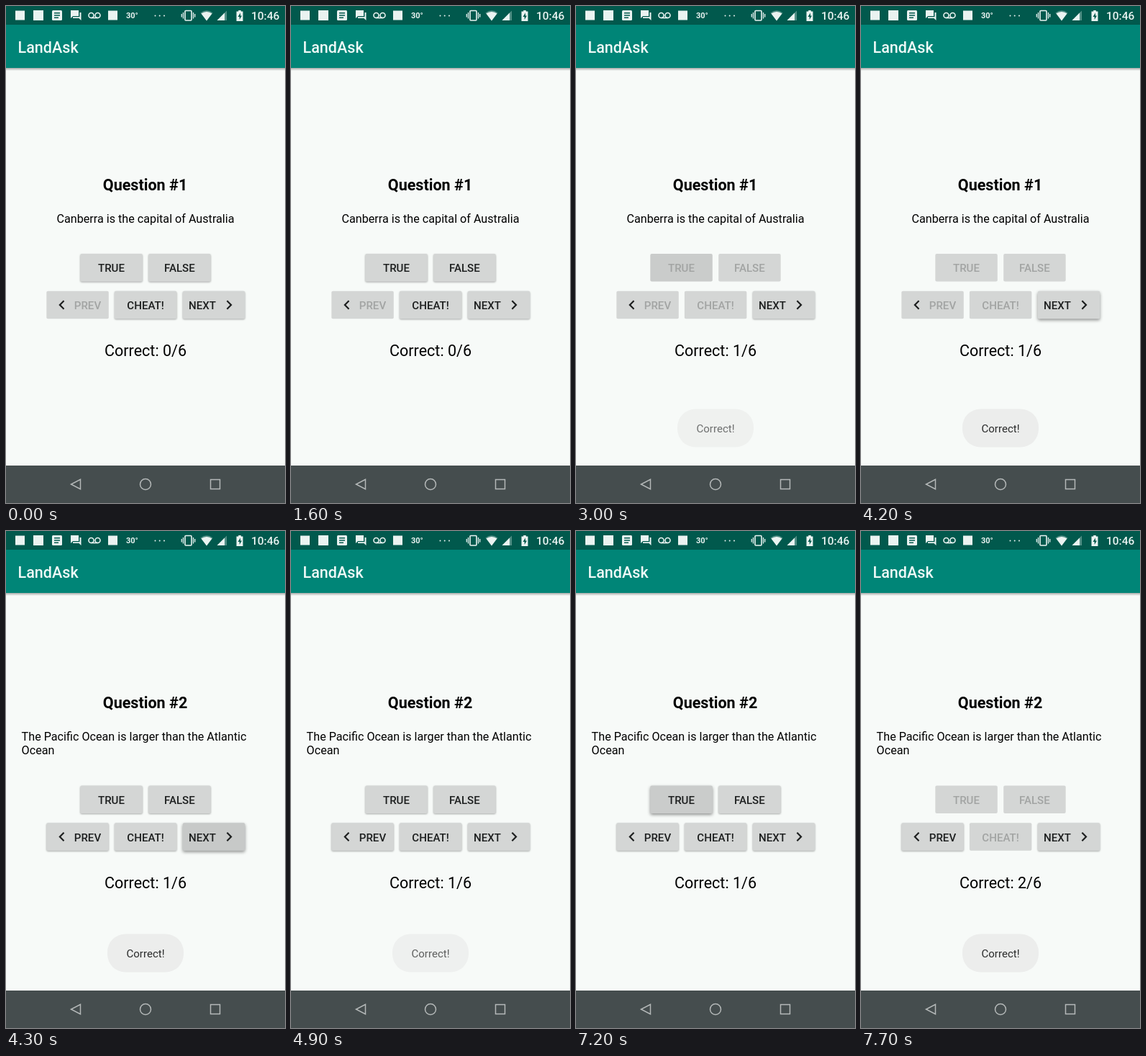
Write an HTML page that moves like this. It is 388 px wide and 690 px high and loops after 8000 ms.

```html
<!DOCTYPE html>
<html lang="en">
<head>
<meta charset="utf-8">
<title>Quiz screen</title>
<style>
  html, body { margin: 0; width: 100%; height: 100%; overflow: hidden; background: #f7faf8; }
  svg { display: block; width: 388px; height: 690px; font-family: Roboto, sans-serif; }
  .mid { text-anchor: middle; }
  .head { font-size: 21.56px; }
  .body { font-size: 16.17px; }
  .btn { font-size: 15.09px; font-weight: 500; fill: #1d1f1f; }
  .btn .face { fill: #d4d6d5; filter: drop-shadow(0 1px 1px rgba(0,0,0,.32)); }
  .btn.raised .face { filter: drop-shadow(0 2px 2px rgba(0,0,0,.42)); }
  .btn.off .face { filter: none; }
  .btn.off text { fill: #a2a4a3; }
  .icons { fill: #eaf3f1; }
  .line { fill: none; stroke: #eaf3f1; }
</style>
</head>
<body>
<svg viewBox="0 0 388 690">
  <defs>
    <linearGradient id="shade" x2="0" y2="1">
      <stop offset="0" stop-opacity=".32"/>
      <stop offset="1" stop-opacity="0"/>
    </linearGradient>
  </defs>
  <rect width="388" height="690" fill="#f7faf8"/>
  <rect y="86" width="388" height="4" fill="url(#shade)"/>
  <rect y="26" width="388" height="60" fill="#008577"/>
  <rect width="388" height="26" fill="#01594d"/>
  <text class="head" x="16.5" y="64.5" font-weight="500" fill="#eef9f7">LandAsk</text>

  <g class="icons">
    <rect x="13" y="6.5" width="13" height="13"/>
    <rect x="38" y="6" width="14" height="14"/>
    <rect x="64" y="6" width="14" height="14" rx="1.5"/>
    <path d="M67 9.7h8M67 13h8M67 16.3h6" stroke="#01594d" stroke-width="1.4"/>
    <path d="M90 6h11v8h-8l-3 3z"/>
    <path d="M102.5 9h2v11l-3-3h-8.500v-1.700h9.500z"/>
    <rect x="142" y="6.500" width="13" height="13"/>
    <text x="167" y="17" font-size="11" font-weight="700">30°</text>
    <circle cx="207.500" cy="13.500" r="1"/>
    <circle cx="213.700" cy="13.500" r="1"/>
    <circle cx="220" cy="13.500" r="1"/>
    <path d="M279 20.500L270.500 9.500Q279 2.800 287.500 9.500Z" opacity=".35"/>
    <path d="M279 20.500L271.500 10.500Q279 5.500 286.500 10.500Z"/>
    <path d="M307 6.500V20H293.500Z" opacity=".35"/>
    <path d="M304 9.500V20H293.500Z"/>
    <path d="M320.500 7.500h2.700V6h3.600v1.500h2.700V21h-9z"/>
    <path d="M326 9.500l-3.500 5.500h2.200v4l3.300-5.500h-2z" fill="#01594d"/>
    <text x="341" y="18.800" font-size="15.500" font-weight="500">10:46</text>
  </g>
  <g class="line" stroke-width="1.600">
    <circle cx="118.500" cy="13" r="3.500"/>
    <circle cx="127.500" cy="13" r="3.500"/>
    <path d="M118.500 16.500h9"/>
    <rect x="249" y="6.500" width="9" height="13.500" rx="1"/>
    <path d="M246.500 9v8.500M260.500 9v8.500M244.300 11v4.500M262.700 11v4.500" stroke-width="1.300"/>
  </g>

  <g id="upper">
    <text id="title" class="head mid" x="193.500" y="255.700" font-weight="700"></text>
    <text id="one" class="body mid" x="194" y="300.700">Canberra is the capital of Australia</text>
    <g id="two" class="body">
      <text x="21.600" y="300.700">The Pacific Ocean is larger than the Atlantic</text>
      <text x="21.600" y="319.700">Ocean</text>
    </g>
  </g>
  <g id="lower">
    <g id="buttons"></g>
    <text id="score" class="head mid" x="194" y="486"></text>
  </g>

  <g id="toast">
    <rect x="141" y="559.500" width="106" height="53" rx="25" fill="#ecedec"/>
    <text class="mid" x="194" y="592" font-size="15.090" fill="#2b2c2c">Correct!</text>
  </g>

  <rect y="638" width="388" height="52" fill="#454d4e"/>
  <g fill="none" stroke="#b4b8b8" stroke-width="1.500">
    <path d="M103.500 657.300V670.700L90.500 664Z"/>
    <circle cx="194" cy="664" r="7.500"/>
    <rect x="284.500" y="657.500" width="13" height="13"/>
  </g>
</svg>
<script>
const $ = id => document.getElementById(id);
const DURATION = 8000, TICK = 100, SHIFT = 9.5;
const CHEVRON = 'M15.41 7.41L14 6l-6 6 6 6 1.41-1.41L10.83 12z';

const chevron = (x, dir) =>
  `<path d="${CHEVRON}" transform="translate(${x} 415) scale(${1.078 * dir} 1.078) translate(-11.7 -12)"/>`;

function addButton(label, x, y, textX, extra = '') {
  const g = document.createElementNS('http://www.w3.org/2000/svg', 'g');
  const box = `x="${x}" y="${y}" width="86.500" height="38.500" rx="2"`;
  const anchor = textX ? `x="${textX}"` : `x="${x + 43.2}" text-anchor="middle"`;
  g.innerHTML = `<rect class="face" ${box}/><rect class="ink" ${box} opacity="0"/>${extra}
    <text ${anchor} y="${y + 25.3}">${label}</text>`;
  $('buttons').append(g);
  const ink = g.querySelector('.ink');
  return (enabled, raised, press) => {
    g.setAttribute('class', 'btn' + (enabled ? '' : ' off') + (raised ? ' raised' : ''));
    ink.setAttribute('opacity', press);
  };
}

const setTrue = addButton('TRUE', 103.3, 344);
const setFalse = addButton('FALSE', 198.2, 344);
const setPrev = addButton('PREV', 56.3, 395.8, 94.8, chevron(77.3, 1));
const setCheat = addButton('CHEAT!', 150.9, 395.8);
const setNext = addButton('NEXT', 245.8, 395.8, 254, chevron(310.6, -1));

// [time, value] pairs, linear in between
const TOAST = [[2700, 0], [3150, 1], [4600, 1], [4900, .75], [5200, 0], [7300, 0], [7700, 1]];
const TRUE_INK = [[2400, 0], [2500, .03], [2700, .02], [2900, .06], [3000, .05], [3400, 0],
  [7100, 0], [7200, .05], [7400, .05], [7700, 0]];
const NEXT_INK = [[4200, 0], [4300, .07], [4500, .03], [4800, 0]];

function sample(keys, t) {
  const i = keys.findIndex(k => k[0] > t);
  if (i === 0) return keys[0][1];
  if (i < 0) return keys[keys.length - 1][1];
  const [t0, a] = keys[i - 1], [t1, b] = keys[i];
  return a + (b - a) * (t - t0) / (t1 - t0);
}

const within = (t, from, to) => t >= from && t < to;

function draw(t) {
  const second = t >= 4300;
  const answered = within(t, 2600, 4300) || t >= 7300;
  const shift = second ? SHIFT : 0;

  $('title').textContent = 'Question #' + (second ? 2 : 1);
  $('one').style.display = second ? 'none' : '';
  $('two').style.display = second ? '' : 'none';
  $('upper').setAttribute('transform', `translate(0 ${-shift})`);
  $('lower').setAttribute('transform', `translate(0 ${shift})`);
  $('score').textContent = `Correct: ${t >= 7300 ? 2 : t >= 2600 ? 1 : 0}/6`;

  const pressed = within(t, 2500, 2600) || within(t, 7200, 7300);
  setTrue(!answered, pressed, sample(TRUE_INK, t));
  setFalse(!answered, false, 0);
  setPrev(second, false, 0);
  setCheat(!answered, false, 0);
  setNext(true, within(t, 4200, 4500), sample(NEXT_INK, t));
  $('toast').setAttribute('opacity', sample(TOAST, t));
}

const start = performance.now();
function frame(now) {
  const t = Math.max(0, now - start) % DURATION;
  draw(Math.floor(t / TICK) * TICK);
  requestAnimationFrame(frame);
}
draw(0);
requestAnimationFrame(frame);
</script>
</body>
</html>
```
